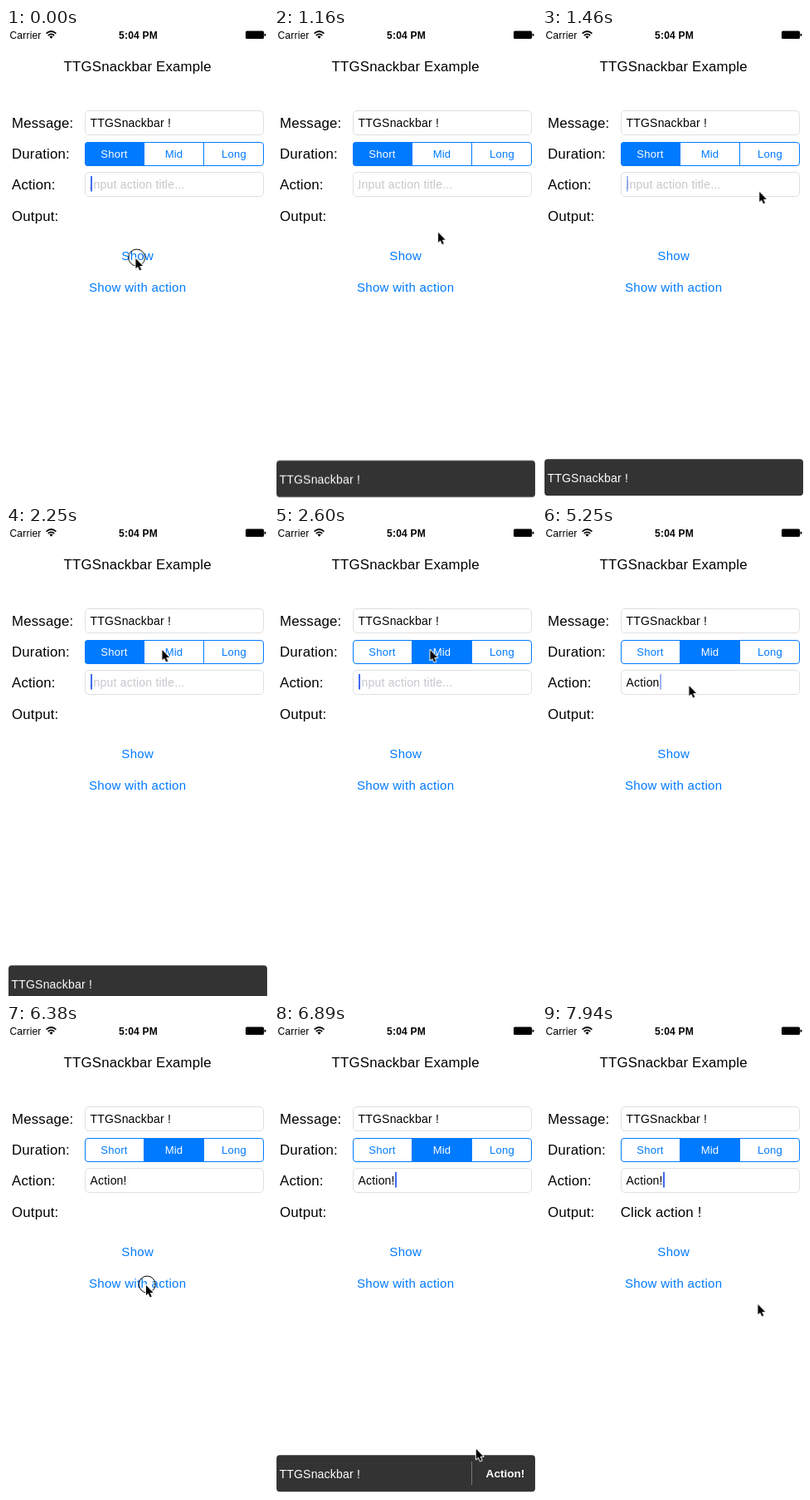
Write an HTML page that moves like this. It is 316 px wide and 565 px high and loops after 8000 ms.

```html
<!DOCTYPE html>
<html lang="en">
<head>
<meta charset="utf-8">
<title>Snackbar example</title>
<style>
html, body { margin: 0; width: 100%; height: 100%; overflow: hidden; background: #fff; }
svg { display: block; width: 316px; height: 565px; }
text { font: 16.8px "Liberation Sans", Arial, sans-serif; letter-spacing: .2px; }
.field text, .bar text { font-size: 14px; }
.field rect { fill: #fff; stroke: #e0e0e0; }
.segments text { font-size: 13.1px; text-anchor: middle; fill: #007aff; }
.links text { font-size: 15px; letter-spacing: .3px; text-anchor: middle; fill: #007aff; }
.status text { font-size: 12px; }
.status .clock { font-weight: bold; text-anchor: middle; }
.bar text { fill: #fff; }
.bar .button { font-size: 13.6px; font-weight: bold; letter-spacing: 0; text-anchor: middle; }

.cursor, .bar, .caret { animation: 8s linear infinite; }
.ring, .follow, .hint, .output, .with-action, .thumb, .segments .short, .segments .mid { animation: 8s step-end infinite; }
.cursor { animation-name: point; }
.ring { animation-name: press; }
.bar { animation-name: slide; }
.with-action { animation-name: reveal-action; }
.caret { animation-name: blink; }
.follow { animation-name: type; }
.hint { animation-name: hide-hint; }
.output { animation-name: show-output; }
.thumb { animation-name: shift; }
.segments .short { animation-name: deselect; }
.segments .mid { animation-name: select; }

@keyframes point {
  0%, 12.1% { transform: translate(155.5px, 276px); }
  18.25% { transform: translate(261.5px, 196px); }
  21.5% { transform: translate(207px, 140px); }
  24.75%, 32.5% { transform: translate(187.5px, 148px); }
  37.8% { transform: translate(180px, 182px); }
  41.2%, 71.1% { transform: translate(176.5px, 191px); }
  77.6%, 82% { transform: translate(168px, 313px); }
  86.1% { transform: translate(242.5px, 509.5px); }
  89.3% { transform: translate(270px, 537px); }
  90.5%, 95.8% { transform: translate(267.5px, 537.5px); }
  99.2%, 100% { transform: translate(259.5px, 336px); }
}
@keyframes press {
  0%, 29.2%, 79.6%, 93.7% { opacity: 1; }
  1.06%, 31.4%, 81.8%, 95.9%, 100% { opacity: 0; }
}
@keyframes slide {
  0%, 12%, 81.5% { transform: translateY(48px); animation-timing-function: cubic-bezier(.2, .7, .3, 1.08); }
  16.6%, 27.7%, 86%, 94.9% { transform: none; animation-timing-function: cubic-bezier(.3, .6, .5, 1); }
  31.9%, 99%, 100% { transform: translateY(48px); }
}
@keyframes reveal-action { 0% { opacity: 0; } 60%, 100% { opacity: 1; } }
@keyframes blink {
  0%, 1%, 7.75%, 12%, 19.5%, 22.5%, 28.1%, 33.5%, 41.2%, 45.7%, 47.75%, 64.6%,
  67.75%, 74.4%, 82%, 86.3%, 95.5%, 100% { opacity: 1; }
  1.1%, 5.4%, 14%, 17.2%, 24.75%, 27.9%, 35.8%, 38.9%, 47.7%, 66.75%, 67.7%,
  76.6%, 79.7%, 88.5%, 93.8% { opacity: 0; }
}
@keyframes type {
  0% { transform: none; }
  47.75% { transform: translateX(9px); }
  50% { transform: translateX(16.2px); }
  53.25% { transform: translateX(20.3px); }
  55.5% { transform: translateX(23.6px); }
  56.7% { transform: translateX(31.6px); }
  58.9%, 67.7% { transform: translateX(40px); }
  67.75%, 100% { transform: translateX(44px); }
}
@keyframes hide-hint { 0% { opacity: 1; } 47.75%, 100% { opacity: 0; } }
@keyframes show-output { 0% { opacity: 0; } 94.9%, 100% { opacity: 1; } }
@keyframes shift { 0% { transform: none; } 30.3%, 100% { transform: translateX(71.5px); } }
@keyframes select { 0% { fill: #007aff; } 30.3%, 100% { fill: #fff; } }
@keyframes deselect { 0% { fill: #fff; } 30.3%, 100% { fill: #007aff; } }
</style>
</head>
<body>
<svg viewBox="0 0 316 565">
  <clipPath id="pill"><rect x="95" y="137" width="216" height="29" rx="4"/></clipPath>

  <g class="status">
    <text x="4.5" y="12.5">Carrier</text>
    <g fill="none" stroke="#000" stroke-width="1.7">
      <path d="M48.6 6.7Q54.5 1.3 60.4 6.7M50.8 9Q54.5 5.6 58.2 9"/>
      <path d="M52.4 10.4Q54.5 8.6 56.6 10.4L54.5 12.7Z" fill="#000" stroke="none"/>
    </g>
    <text class="clock" x="159.5" y="12.5">5:04 PM</text>
    <rect x="289" y="3.5" width="22" height="9.5" rx="1.5"/>
    <path d="M311.5 6.5Q313.5 6.8 313.5 8.3T311.5 10.1Z"/>
  </g>

  <text x="158.7" y="52" text-anchor="middle">TTGSnackbar Example</text>
  <text x="7" y="119.5">Message:</text>
  <text x="7" y="156.5">Duration:</text>
  <text x="7" y="193.5">Action:</text>
  <text x="7" y="231.5">Output:</text>
  <text class="output" x="94.7" y="231.5">Click action !</text>

  <g class="field">
    <rect x="95.5" y="99.5" width="215" height="29" rx="4.5"/>
    <text x="101.5" y="118.7">TTGSnackbar !</text>
  </g>

  <g class="segments">
    <g clip-path="url(#pill)"><rect class="thumb" x="95" y="137" width="72" height="29" fill="#007aff"/></g>
    <g fill="none" stroke="#007aff">
      <rect x="95.5" y="137.5" width="215" height="28" rx="3.5"/>
      <path d="M166.5 137V166M238.5 137V166"/>
    </g>
    <text class="short" x="130.5" y="156.3">Short</text>
    <text class="mid" x="202.5" y="156.3">Mid</text>
    <text x="275" y="156.3">Long</text>
  </g>

  <g class="field">
    <rect x="95.5" y="173.5" width="215" height="29" rx="4.5"/>
    <text x="101.5" y="192.7">Action!</text>
    <!-- masks the letters that are not typed yet -->
    <g class="follow"><path d="M102 176h60v24h-60z" fill="#fff"/></g>
    <text class="hint" x="101.5" y="192.7" fill="#c7c7cd">Input action title...</text>
    <g class="follow"><path class="caret" d="M102 178h2v18.5h-2z" fill="#426bf2"/></g>
  </g>

  <g class="links">
    <text x="158.7" y="279.2">Show</text>
    <text x="158.7" y="317.2">Show with action</text>
  </g>

  <g class="bar">
    <rect x="3" y="518.3" width="312" height="44" rx="4" fill="#333"/>
    <text x="6.5" y="545.5">TTGSnackbar !</text>
    <g class="with-action">
      <path d="M238.5 526V554" stroke="#777"/>
      <text class="button" x="279" y="545.3">Action!</text>
    </g>
  </g>

  <g class="cursor">
    <circle class="ring" cx="2.2" cy="0" r="10" fill="none" stroke="#000"/>
    <path d="M.9 .9V13.2L3.6 10.7L5.8 15.4L7.7 14.6L5.7 9.9H9.6Z" stroke="#fff" stroke-width="2" paint-order="stroke" stroke-linejoin="round"/>
  </g>
</svg>
</body>
</html>
```
